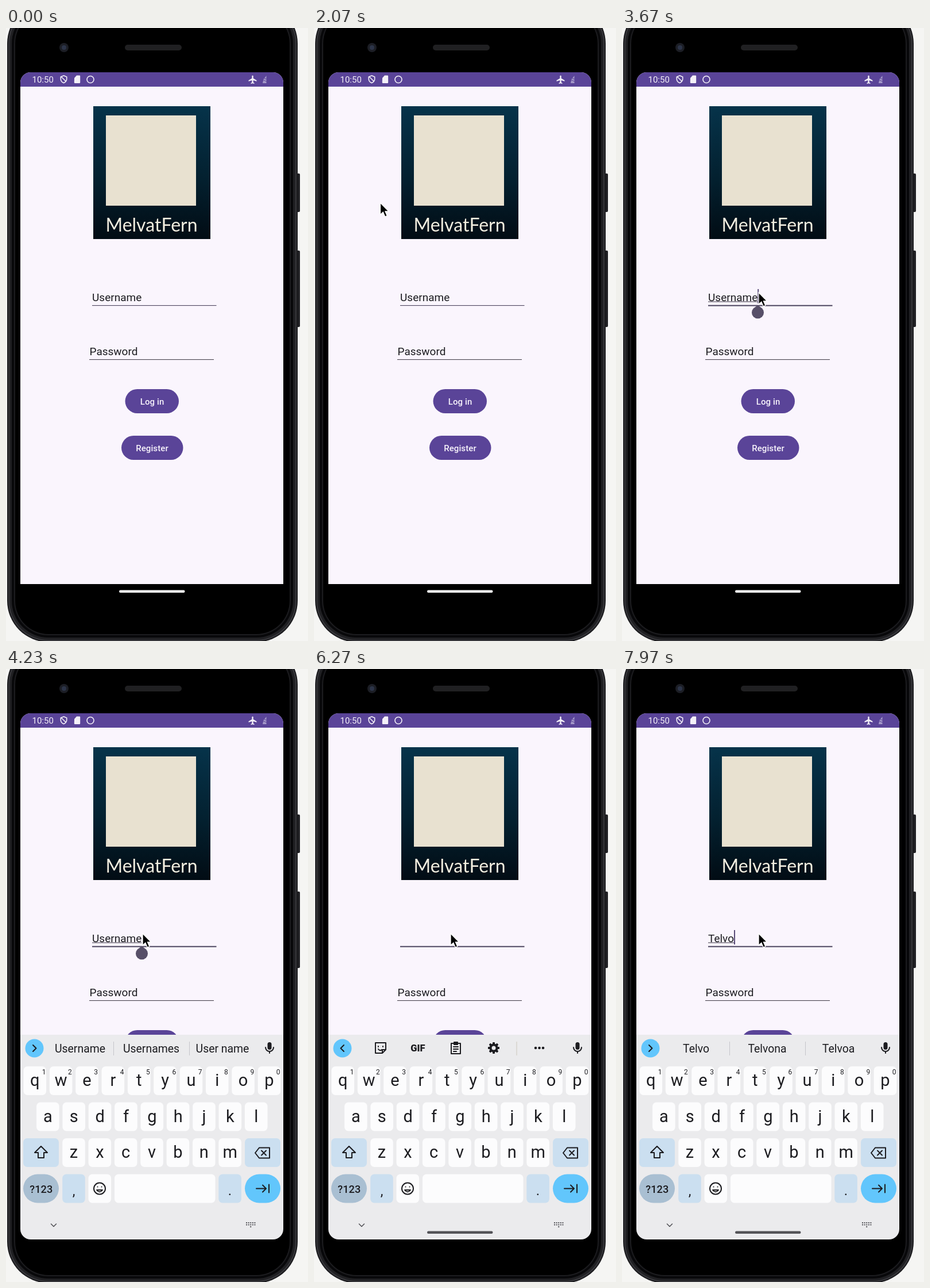
These frames come from a looping animation (526 px wide and 1066 px high, 8000 ms). An HTML page:

```html
<!DOCTYPE html>
<html lang="en">
<head>
<meta charset="utf-8">
<title>Login screen</title>
<style>
  html, body { margin: 0; width: 100%; height: 100%; overflow: hidden; background: #f5f5f3; }
  svg { display: block; width: 526px; height: 1066px; font-family: Roboto, sans-serif; }
  .mid { text-anchor: middle; }
  .line { fill: none; stroke: #1c1c20; stroke-width: 2; stroke-linejoin: round; stroke-linecap: round; }
</style>
</head>
<body>
<svg id="stage" viewBox="0 0 526 1066" xmlns="http://www.w3.org/2000/svg"></svg>
<script>
const LOOP = 8000, TAP = 3450;
const HINT = 'Username', NAME = 'Telvo';
const PURPLE = '#5a4498', INK = '#1c1c20', BLUE = '#62c6fc', PALE = '#cbdff0';

const rect = (x, y, w, h, fill, r = 0, more = '') =>
  `<rect x="${x}" y="${y}" width="${w}" height="${h}" rx="${r}" fill="${fill}" ${more}/>`;
const text = (x, y, size, str, more = '') =>
  `<text x="${x}" y="${y}" font-size="${size}" fill="${INK}" ${more}>${str}</text>`;
const mid = (x, y, size, str, more = '') => text(x, y, size, str, `class="mid" ${more}`);
const line = (d, more = '') => `<path class="line" d="${d}" ${more}/>`;
const at = (x, y, inner) => `<g transform="translate(${x} ${y})">${inner}</g>`;

function phone() {
  const shell = (inset, fill) =>
    rect(2 + inset, -45 + inset, 506 - 2 * inset, 1113 - 2 * inset, fill, 72 - inset);
  return rect(506, 253, 6, 67, '#202024', 2) + rect(506, 387, 6, 133, '#202024', 2) +
    shell(0, '#19191c') + shell(2, '#37373b') + shell(4, '#202023') +
    shell(8, '#08080a') + shell(12, '#1c1c1f') + shell(14, '#000') +
    '<circle cx="101" cy="34" r="8" fill="#1c1e25"/><circle cx="101" cy="34" r="4" fill="#2c3448"/>' +
    rect(207, 29, 99, 10, '#202022', 5);
}

function statusBar() {
  const white = 'fill="#f3f0f8"';
  return rect(25, 77, 458, 25, PURPLE) +
    `<text x="45.5" y="95" font-size="15" ${white}>10:50</text>` +
    at(100.5, 89, '<path d="M0-6.2 5.2-4V0Q5 4.5 0 6.6-5 4.5-5.2 0V-4ZM-4-4 4 4" fill="none" stroke="#f3f0f8" stroke-width="1.6"/>') +
    `<path d="M119 87l4-4.500h5q1.200 0 1.200 1.200v11q0 1.300-1.200 1.300h-8q-1.200 0-1.200-1.300z" ${white}/>` +
    '<circle cx="147" cy="89.500" r="6" fill="none" stroke="#f3f0f8" stroke-width="1.600"/>' +
    at(429.5, 89.5, `<path d="M-1.200-6q1.200-2 2.400 0v4L7 1.500v1.700L1.200 1.500v3.500L3 6.300v1.200L0 6.700-3 7.500V6.300L-1.200 5V1.500L-7 3.200V1.500L-1.200-2Z" ${white}/>`) +
    '<path d="M447 96l1.500-7 5-6v13z" fill="#a397c8"/><path d="M447 90l7 3M448 87l6 2" stroke="#5a4498"/>';
}

function button(x, y, w, label) {
  return rect(x, y, w, 42, PURPLE, 21) +
    mid(254.5, y + 27, 15, label, 'font-weight="500" letter-spacing=".1" style="fill:#f7f3fb"');
}

function loginForm() {
  return rect(25, 77, 458, 890, '#faf5fd') + statusBar() +
    rect(152, 136, 204, 231, 'url(#tile)') + rect(174, 152, 157, 157, '#e8e1d0') +
    mid(253.5, 354, 32, 'MelvatFern', 'style="font-family:Lato,sans-serif;fill:#f3eee0"') +
    text(150, 474.5, 19, HINT, 'id="entry"') +
    '<rect id="composing" x="150" y="475.500" height="1" fill="#3a3542"/>' +
    '<rect id="entryLine" x="150" width="216.500" fill="#4d4660"/>' +
    text(145.5, 569, 19, 'Password') + rect(145, 576, 217, 1.1, '#4a4550') +
    button(207.5, 628, 93.5, 'Log in') + button(201, 709, 107.5, 'Register') +
    '<rect id="caret" y="454" width="2" height="25" fill="#5a4c78"/>' +
    '<path id="handle" d="M236.500 482l7.500 5.500a10.500 10.500 0 1 1-15 0z" fill="#574f68"/>';
}

function toolbar() {
  const gear = Array.from({ length: 8 }, (_, i) =>
    rect(-2, -10, 4, 6, INK, 1, `transform="rotate(${i * 45})"`)).join('');
  return at(116, 659, line('M-9-9H9V3L3 9H-9ZM3 9V3H9M-4-3v1M4-3v1M-4 2Q-1 6 2 3')) +
    mid(181, 665, 16.5, 'GIF', 'font-weight="900"') +
    at(247, 659, line('M-8-8H8V10H-8ZM-4-2H4M-4 2H4M-4 6H1') + rect(-4, -11, 8, 6, INK, 1)) +
    at(313, 659, gear + `<circle r="5.500" fill="none" stroke="${INK}" stroke-width="4"/>`) +
    rect(352.5, 648, 1, 24, '#cbc7bd') +
    [386, 392.5, 399].map(x => `<circle cx="${x}" cy="659" r="2.300" fill="${INK}"/>`).join('');
}

function keyRow(letters, x0, y, digits) {
  return [...letters].map((ch, i) => {
    const x = x0 + 45.35 * i;
    return rect(x, y, 39.6, 50, '#fcfcfd', 7) + mid(x + 19.8, y + 34, 29, ch) +
      (digits ? mid(x + 35.5, y + 13.5, 12, (i + 1) % 10) : '');
  }).join('');
}

function keyboard() {
  const dots = [0, 1, 2].map(r => [0, 1, 2, 3, 4].map(c =>
    r === 2 && c !== 2 ? '' : rect(418 + c * 3.6, 962 + r * 3.5, 2, 2, '#55555a')).join('')).join('');
  return rect(25, 636, 458, 380, '#ebebed') +
    `<circle cx="49.500" cy="659.500" r="16" fill="${BLUE}"/>` + line('', 'id="arrow"') +
    '<g id="words">' + [129, 253, 377].map(x => mid(x, 667, 19.4, '')).join('') +
    rect(187, 648, 1, 24, '#c5c5ca') + rect(319, 648, 1, 24, '#c5c5ca') + '</g>' +
    `<g id="tools">${toolbar()}</g>` +
    at(459, 659, rect(-3.5, -10, 7, 13, INK, 3.5) + line('M-7-1A7 7 0 0 0 7-1M0 6V9')) +
    keyRow('qwertyuiop', 30.5, 691, true) + keyRow('asdfghjkl', 53.1, 753.5) +
    rect(30, 816, 62, 50, PALE, 7) + at(61, 841, line('M0-11L11 0H5V9H-5V0H-11Z')) +
    keyRow('zxcvbnm', 98.2, 816) +
    rect(416, 816, 62, 50, PALE, 7) + at(447, 841.5, line('M-13 0L-6-9H12V9H-6ZM-2-4L6 4M6-4L-2 4')) +
    rect(30, 878.5, 62, 50, '#a9bfd2', 25) + mid(61.3, 910.5, 18.2, '?123', 'font-weight="500"') +
    rect(98.2, 878.5, 39.6, 50, PALE, 7) + mid(118, 916, 24, ',') +
    rect(143.5, 878.5, 39.6, 50, '#fcfcfd', 7) +
    at(163, 903.5, '<circle class="line" r="10"/>' + line('M-5 2.500Q0 9 5 2.500ZM-3.500-3v.1M3.500-3v.1')) +
    rect(189, 878.5, 175.5, 50, '#fcfcfd', 7) +
    rect(370.3, 878.5, 39.6, 50, PALE, 7) + mid(390, 915, 24, '.') +
    rect(416, 878.5, 62, 50, BLUE, 25) + at(447, 903.5, line('M-11 0H6M0-6L6 0 0 6M11-7V7')) +
    line('M78.500 965l4.500 4.500 4.500-4.500', 'style="stroke:#55555a;stroke-width:1.600"') + dots;
}

const stage = document.getElementById('stage');
stage.innerHTML = `<defs>
  <linearGradient id="tile" x2="0" y2="1"><stop stop-color="#06334a"/>
    <stop offset=".55" stop-color="#03202f"/><stop offset="1" stop-color="#020c14"/></linearGradient>
  <clipPath id="screen">${rect(25, 77, 458, 915, '#000', 18)}</clipPath></defs>` +
  phone() + `<g clip-path="url(#screen)">${loginForm()}<g id="keys">${keyboard()}</g></g>` +
  rect(197, 977.5, 114.5, 4.5, '#f4f4f4', 2.2, 'id="pill"') +
  `<path id="pointer" d="M0 0V20.500L4.800 16.200 8.200 24 11.800 22.500 8.500 14.800H14.500Z" fill="#000" stroke="#fff" stroke-width="1.300"/>`;

const ui = {};
stage.querySelectorAll('[id]').forEach(el => ui[el.id] = el);
const wordSlots = ui.words.querySelectorAll('text');

const show = (el, on) => el.setAttribute('visibility', on ? 'inherit' : 'hidden');
const ramp = (t, a, b) => Math.min(1, Math.max(0, (t - a) / (b - a)));

// Eight deletions, then the name is typed.
const edits = [...HINT].map((_, i) => 4650 + 150 * i)
  .concat([...NAME].map((_, i) => 6500 + 250 * i));

function entryAt(t) {
  const n = edits.filter(e => e <= t).length;
  return n <= HINT.length ? HINT.slice(0, HINT.length - n) : NAME.slice(0, n - HINT.length);
}

function suggestions(word) {
  if (word === HINT) return [HINT, 'Usernames', 'User name'];
  if (word === NAME) return [NAME, NAME + 'na', NAME + 'a'];
  return HINT.startsWith(word) ? [word, HINT, 'Usernames'] : [word, NAME, NAME + 'na'];
}

const path = [[1880, -16, 236], [2070, 115.5, 304], [2750, 238, 460]];
function pointerAt(t) {
  const i = t < path[1][0] ? 0 : 1;
  const [a, b] = [path[i], path[i + 1]];
  const p = ramp(t, a[0], b[0]), k = i ? p * p * (3 - 2 * p) : p;
  return [a[1] + (b[1] - a[1]) * k, a[2] + (b[2] - a[2]) * k];
}

function draw(t) {
  const focused = t >= TAP;
  const value = entryAt(t);
  ui.entry.textContent = value;
  const width = value ? ui.entry.getComputedTextLength() : 0;
  ui.composing.setAttribute('width', focused ? width : 0);
  ui.entryLine.setAttribute('y', focused ? 481.7 : 482);
  ui.entryLine.setAttribute('height', focused ? 2 : 1.1);

  const lastEdit = Math.max(TAP, ...edits.filter(e => e <= t));
  ui.caret.setAttribute('x', 150 + width);
  show(ui.caret, focused && (t - lastEdit) % 1000 < 500);
  show(ui.handle, focused && t < edits[0]);

  const rise = 1 - (1 - ramp(t, 3720, 4020)) ** 3;
  ui.keys.setAttribute('transform', `translate(0 ${360 * (1 - rise)})`);
  show(ui.keys, rise > 0);

  const hint = entryAt(t - 100);
  show(ui.words, hint);
  show(ui.tools, !hint);
  ui.arrow.setAttribute('d', hint ? 'M47 654l5.500 5.500-5.500 5.500' : 'M52 654l-5.500 5.500 5.500 5.500');
  if (hint) suggestions(hint).forEach((word, i) => wordSlots[i].textContent = word);

  ui.pill.setAttribute('fill', rise > 0 ? '#535357' : '#f4f4f4');
  ui.pill.setAttribute('opacity', rise > 0 ? ramp(t, 4900, 5230) : 1);

  const [x, y] = pointerAt(t);
  ui.pointer.setAttribute('transform', `translate(${x} ${y})`);
  show(ui.pointer, t >= path[0][0]);
}

const start = performance.now();
function tick() {
  draw((performance.now() - start) % LOOP);
  requestAnimationFrame(tick);
}
tick();
</script>
</body>
</html>
```
